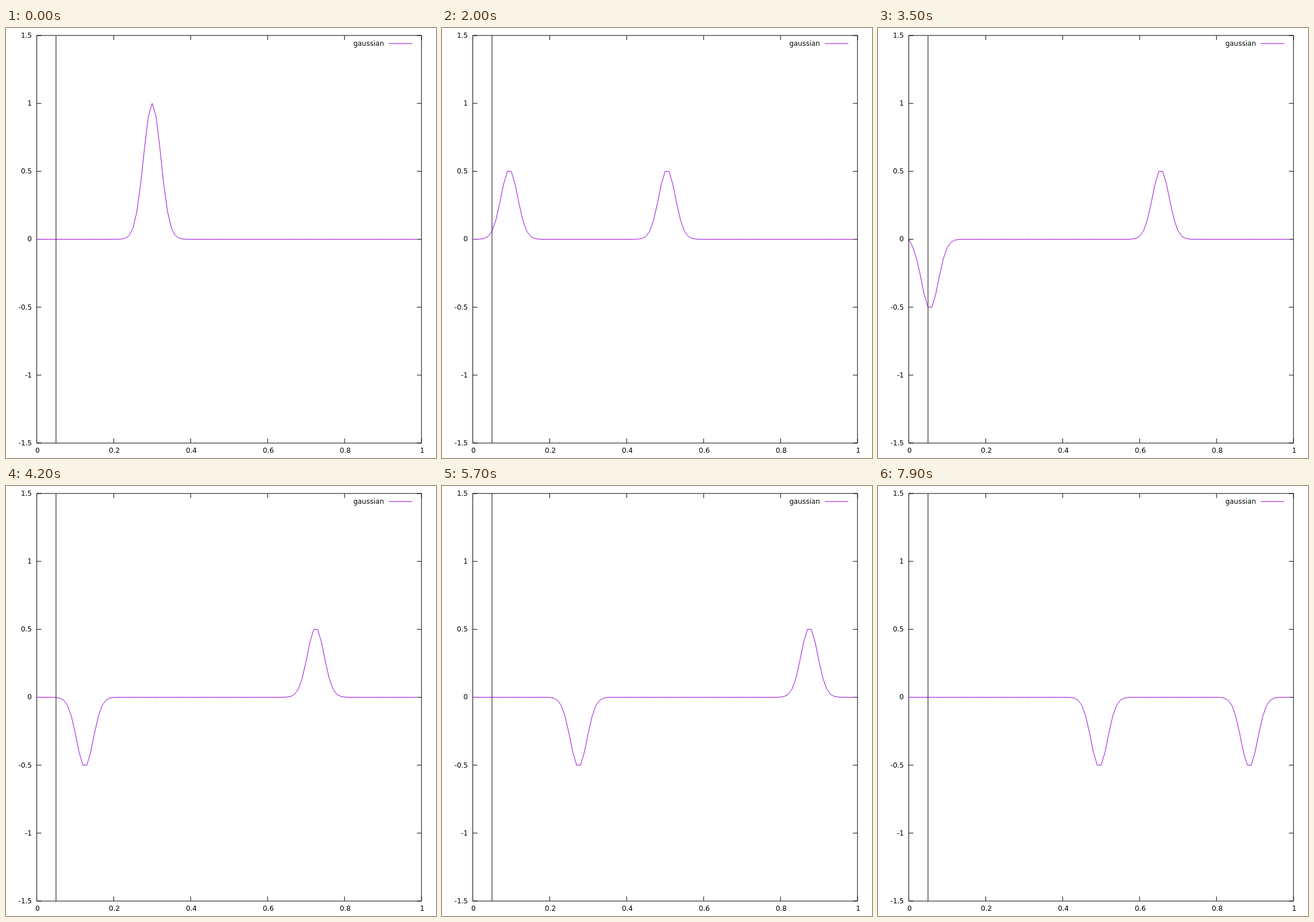
Write an HTML page that moves like this. It is 748x748 px and loops after 8000 ms.

```html
<!DOCTYPE html>
<html lang="en">
<head>
<meta charset="utf-8">
<title>Gaussian wave</title>
<style>
  html, body { margin: 0; width: 100%; height: 100%; overflow: hidden; background: #fff; }
  svg { display: block; width: 748px; height: 748px; }
  path, polyline { fill: none; stroke: #000; stroke-width: 1; stroke-linejoin: round; }
  .wave { stroke: #9400d3; }
  text { font: 12px "DejaVu Sans", sans-serif; fill: #000; }
  .end { text-anchor: end; }
  .mid { text-anchor: middle; }
</style>
</head>
<body>
<svg viewBox="0 0 748 748">
  <path id="ticks"/>
  <g id="labels"></g>
  <text class="end" x="657.5" y="31">gaussian</text>
  <path class="wave" d="M665.75 27H706.75"/>
  <polyline id="curve" class="wave"/>
  <path id="border"/>
</svg>
<script>
const LEFT = 53.55, RIGHT = 722.75, TOP = 13, BOTTOM = 722;
const POINTS = 100, STEPS = 80, STEP_MS = 100, TICK = 8;

const byId = id => document.getElementById(id);
const px = x => LEFT + x * (RIGHT - LEFT);
const py = y => (TOP + BOTTOM) / 2 - y * (BOTTOM - TOP) / 3;

function addLabel(cls, x, y, value) {
  const t = document.createElementNS("http://www.w3.org/2000/svg", "text");
  t.setAttribute("class", cls);
  t.setAttribute("x", x);
  t.setAttribute("y", Math.round(y));
  t.textContent = value;
  byId("labels").append(t);
}

function drawAxes() {
  let d = `M${px(0.05)} ${TOP}V${BOTTOM}`;
  for (let i = 0; i <= 5; i++) {
    const x = px(i / 5);
    d += `M${x} ${TOP}v${TICK}M${x} ${BOTTOM}v${-TICK}`;
    addLabel("mid", x + 1.2, 739, i / 5);
  }
  for (let i = -3; i <= 3; i++) {
    const y = py(i / 2);
    d += `M${LEFT} ${y}h${TICK}M${RIGHT} ${y}h${-TICK}`;
    addLabel("end", 45, y + 3.9, i / 2);
  }
  byId("ticks").setAttribute("d", d);
  byId("border").setAttribute("d", `M${LEFT} ${TOP}H${RIGHT}V${BOTTOM}H${LEFT}Z`);
}

// Leapfrog wave equation, one cell per step, fixed ends, starting at rest.
function solveWave() {
  let now = Array.from({ length: POINTS }, (_, i) => Math.exp(-1000 * (i / 100 - 0.3) ** 2));
  now[0] = now[POINTS - 1] = 0;
  let before = now;
  const states = [];
  for (let n = 0; n < STEPS; n++) {
    states.push(now);
    const next = now.map((_, i) =>
      i === 0 || i === POINTS - 1 ? 0 : now[i - 1] + now[i + 1] - before[i]);
    before = now;
    now = next;
  }
  return states;
}

drawAxes();
const curve = byId("curve");
const shapes = solveWave().map(u =>
  u.map((y, i) => `${px(i / 100).toFixed(2)},${py(y).toFixed(2)}`).join(" "));

let shown = -1;
function render() {
  const step = Math.floor(performance.now() / STEP_MS) % STEPS;
  if (step !== shown) curve.setAttribute("points", shapes[shown = step]);
  requestAnimationFrame(render);
}
render();
</script>
</body>
</html>
```
